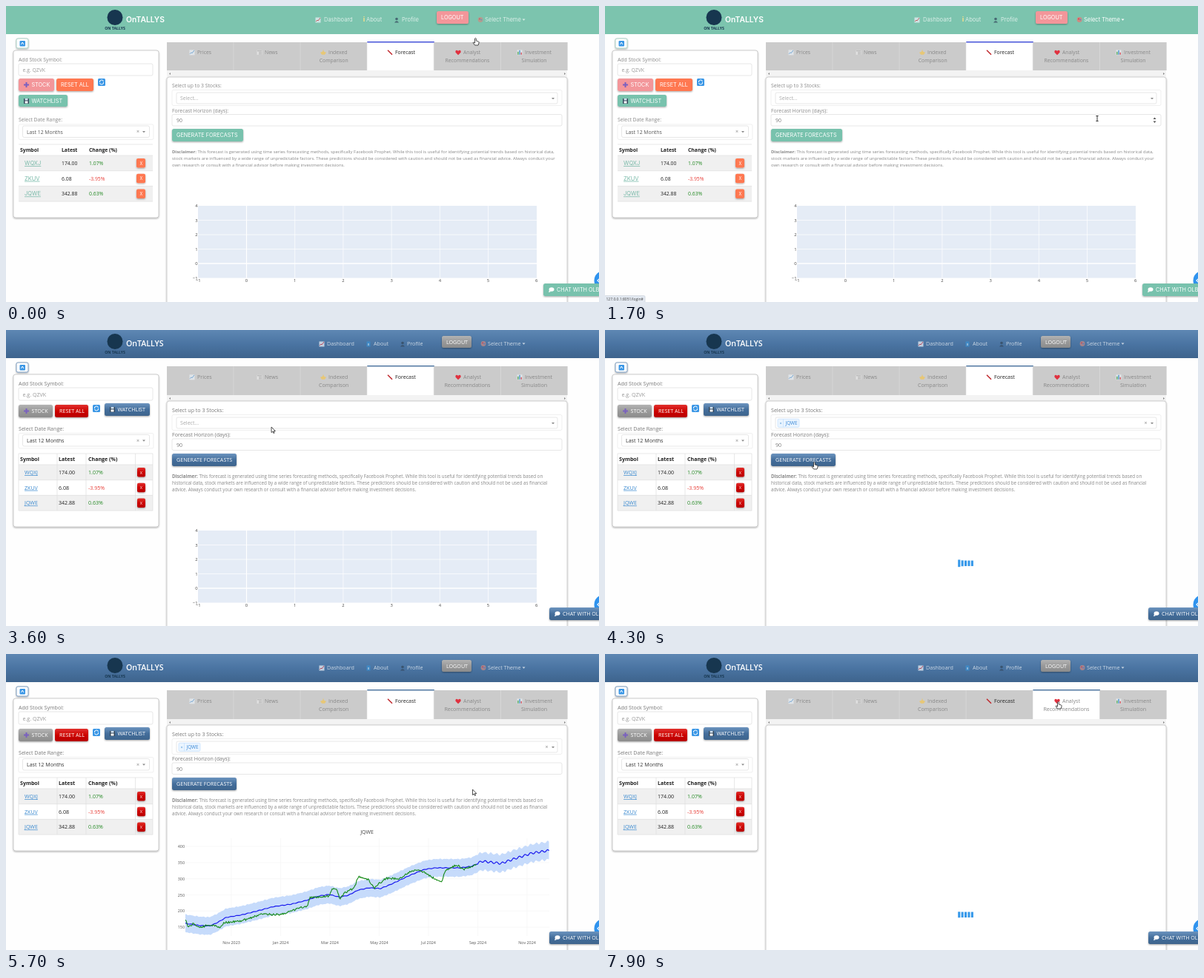
An HTML page that plays this animation: 800x400 px, repeating every 8000 ms.

```html
<!DOCTYPE html>
<html lang="en">
<head>
<meta charset="utf-8">
<title>Stock dashboard</title>
<style>
html, body { margin: 0; height: 100%; overflow: hidden; background: #fefefe; }
svg { display: block; width: 100vw; height: 100vh; font-family: "Open Sans", "Noto Sans", sans-serif; }
.wide { font-family: Inter, "Open Sans", sans-serif; }
</style>
</head>
<body>
<svg viewBox="0 0 800 400">
  <defs>
    <linearGradient id="bar" x2="0" y2="1"><stop stop-color="#5e87b3"/><stop offset=".5" stop-color="#4a74a2"/><stop offset="1" stop-color="#3e648d"/></linearGradient>
    <linearGradient id="navy" x2="0" y2="1"><stop stop-color="#6d94bf"/><stop offset=".5" stop-color="#446e9b"/><stop offset="1" stop-color="#3e648d"/></linearGradient>
    <linearGradient id="gray" x2="0" y2="1"><stop stop-color="#b3b3b3"/><stop offset=".5" stop-color="#999"/><stop offset="1" stop-color="#8c8c8c"/></linearGradient>
    <linearGradient id="red" x2="0" y2="1"><stop stop-color="#e1322f"/><stop offset=".5" stop-color="#cd0200"/><stop offset="1" stop-color="#b80200"/></linearGradient>
    <filter id="shadow" x="-10%" y="-10%" width="120%" height="130%"><feDropShadow dx="0" dy="1" stdDeviation="1" flood-opacity=".35"/></filter>
  </defs>
  <g id="page"></g>
  <g id="overlay"></g>
</svg>
<script>
const LOOP = 8000;
const TIMES = { focus: 400, status: 500, restyle: 1800, blur: 3500, pick: 3800, load: 4200, chart: 5200, tab: 7700 };
const BRAND = 'OnTALLYS', TICKERS = ['WQXJ', 'ZKUV', 'JQWE'];
const ROWS = [['174.00', '1.07%'], ['6.08', '-3.95%'], ['342.88', '0.63%']];

const THEMES = {
  mint: {
    cls: 'wide', body: 6.84, small: 5.92, btn: 7.25, nav: 7.5, bar: '#7cc4ae', primary: '#78c2ad', second: '#f3969a',
    danger: '#ff7851', label: '#888', ink: '#555', link: '#78b9a8', tabTop: '#3a48d6', dy: 0,
    navItems: [[421, 429, 'Dashboard'], [483, 486, 'About'], [527, 534, 'Profile']], theme: 646, logout: [581, 7, 43, 17],
    cardBottom: 286, stock: [17, 98, 48, 17], reset: [68, 98, 50, 17], refresh: [124, 98], watch: [17, 120, 66, 16],
    range: 156, table: 187, cols: [19, 75, 112], generate: 96, chat: 725,
    notes: ['This forecast is generated using time series forecasting methods, specifically Facebook Prophet. While this tool is useful for identifying potential trends based on historical data,',
      'stock markets are influenced by a wide range of unpredictable factors. These predictions should be considered with caution and should not be used as financial advice. Always conduct your',
      'own research or consult with a financial advisor before making investment decisions.']
  },
  slate: {
    cls: '', body: 7.08, small: 6.24, btn: 7.15, nav: 7.15, bar: 'url(#bar)', primary: 'url(#navy)', second: 'url(#gray)',
    danger: 'url(#red)', label: '#777', ink: '#333', link: '#3b8ad0', tabTop: '#446e9b', dy: 1,
    navItems: [[426, 433, 'Dashboard'], [489, 496, 'About'], [535, 541, 'Profile']], theme: 650, logout: [588, 8, 40, 16],
    cardBottom: 266, stock: [17, 101, 46, 17], reset: [66, 101, 45, 17], refresh: [117, 101], watch: [133, 99, 61, 17],
    range: 135.5, table: 167, cols: [19, 71, 111], generate: 87, chat: 733,
    notes: ['This forecast is generated using time series forecasting methods, specifically Facebook Prophet. While this tool is useful for identifying potential trends based on',
      'historical data, stock markets are influenced by a wide range of unpredictable factors. These predictions should be considered with caution and should not be used as financial',
      'advice. Always conduct your own research or consult with a financial advisor before making investment decisions.']
  }
};

const rect = (x, y, w, h, fill, more = '') => `<rect x="${x}" y="${y}" width="${w}" height="${h}" fill="${fill}" ${more}/>`;
const text = (x, y, s, size, fill, more = '') => `<text x="${x}" y="${y}" font-size="${size}" fill="${fill}" ${more}>${s}</text>`;
const path = (d, stroke, width = 1, fill = 'none') => `<path d="${d}" stroke="${stroke}" stroke-width="${width}" fill="${fill}"/>`;
const dot = (x, y, r, fill) => `<circle cx="${x}" cy="${y}" r="${r}" fill="${fill}"/>`;
const box = (x, y, w, h, stroke = '#ddd') => rect(x, y, w, h, '#fff', `rx="2" stroke="${stroke}" stroke-width=".7"`);
const caret = (x, y, fill = '#888') => path(`M${x - 2} ${y - 1}h4l-2 2.2z`, 'none', 0, fill);
const middle = 'text-anchor="middle"', bold = 'font-weight="700"';

function button(th, [x, y, w, h], fill, label, inset = 6) {
  return rect(x, y, w, h, fill, 'rx="2.5" filter="url(#shadow)"') +
    text(x + inset, y + h / 2 + 2.5, label, th.btn, '#fff', `class="${th.cls}"`);
}

// Small pictograms, centred on x, y
const ICONS = {
  chart: rect(-3.5, -3.5, 7, 7, '#e9eef4') + path('M-3 2L-1 0L0 1L3 -3', '#d8434e', 1),
  prices: rect(-3.5, -3.5, 7, 7, '#e6edf3') + path('M-3 2L-1 0L0 1L3 -3', '#5b9bd5', 1),
  book: rect(-2.5, -3.5, 5, 7, '#3b8fd0') + path('M0 -1V2', '#fff', 1),
  person: dot(0, -1.5, 1.8, '#34495e') + path('M-3 3.5Q0 -1 3 3.5z', 'none', 0, '#34495e'),
  palette: dot(0, 0, 3.4, '#cf8a80') + dot(-1, -1, 1, '#d83e50') + dot(1.3, 0, 1, '#5b86c9'),
  news: rect(-3.5, -3, 7, 6, '#e8e8e8') + path('M-3 -2H3M-1 0H3M-1 2H3', '#888', .7),
  star: path('M0 -4L1 -1L4 0L2 3H-2L-4 0L-1 -1z', 'none', 0, '#f0c65a'),
  trend: path('M-3 -3L-1 -1L0 0L3 3', '#c0282d', 1.5),
  heart: path('M0 3.5L-3.5 0Q-4 -3 -2 -3Q0 -3 0 -1.5Q0 -3 2 -3Q4 -3 3.5 0z', 'none', 0, '#e0313f'),
  bars: rect(-3.5, -3.5, 7, 7, '#e6edf3') + rect(-3, -1, 1.6, 4, '#4caf50') + rect(-.8, -3, 1.6, 6, '#3b8fd0') + rect(1.4, 0, 1.6, 3, '#d8434e'),
  floppy: rect(-3.5, -3.5, 7, 7, '#33475b') + rect(-2, -3.5, 4, 2.5, '#cfe0ee') + rect(-2, 0, 4, 3, '#fff'),
  plus: path('M-3.5 0H3.5M0 -3.5V3.5', '#7a60c0', 2)
};
const icon = (name, x, y, opacity = 1) => `<g transform="translate(${x} ${y})" opacity="${opacity}">${ICONS[name]}</g>`;

function navbar(th, focused) {
  const mint = th.cls === 'wide', cls = `class="${th.cls}"`, faded = 'rgba(255,255,255,.72)';
  const names = ['chart', 'book', 'person'];
  let out = rect(0, 0, 800, 38, th.bar) + dot(147, 15.5, 10.5, '#17364f') +
    text(147, 32, BRAND.replace('On', 'ON '), 5.2, '#17364f', `${middle} ${bold}`) +
    text(162, 21.5, BRAND, mint ? 10.3 : 10.6, '#fff', `${cls} font-weight="600"`);
  th.navItems.forEach(([ix, x, s], i) => {
    out += mint && i === 1 ? path('M483 16V21M483 14V15', '#f2e08a', 1.4) : icon(names[i], ix, 19, .75);
    out += text(x, 21.3, s, th.nav, faded, cls);
  });
  return out + button(th, th.logout, th.second, 'LOGOUT') +
    icon('palette', th.theme - 6, 18.5, focused ? 1 : .7) +
    text(th.theme, 21.3, 'Select Theme', th.nav, focused ? '#fff' : faded, cls) + caret(698.5, 18.5, focused ? '#fff' : faded);
}

function sidebar(th) {
  const mint = th.cls === 'wide', b = th.body, r = th.range, top = th.table;
  let out = rect(14, 44, 16, 13, '#fff', `rx="2" stroke="${mint ? '#a9cfc4' : '#7b9cbf'}" filter="url(#shadow)"`) +
    rect(18.5, 47, 7.5, 7.5, '#3b97e6', 'rx="1"') + path('M20.5 52L22.2 49L24 52', '#fff', 1) +
    rect(10, 60, 196, th.cardBottom - 60, '#fff', 'rx="3" stroke="#bbb" stroke-width=".7" filter="url(#shadow)"') +
    text(17, 75, 'Add Stock Symbol:', b, th.label) + box(17, 78, 181, 16 + th.dy) + text(22.5, 89 + th.dy / 2, 'e.g. QZVK', b, '#999') +
    button(th, th.stock, th.second, 'STOCK', 17.5) + icon('plus', th.stock[0] + 10.5, th.stock[1] + 8.5) +
    button(th, th.reset, th.danger, 'RESET ALL') +
    button(th, th.watch, th.primary, 'WATCHLIST', 17.5) + icon('floppy', th.watch[0] + 10.5, th.watch[1] + 8.5);
  const [rx, ry] = th.refresh;
  out += rect(rx, ry, 10, 10, '#3b97e6', 'rx="1.5"') + path(`M${rx + 2.5} ${ry + 5}a2.5 2.5 0 0 1 5 -1M${rx + 7.5} ${ry + 5}a2.5 2.5 0 0 1 -5 1`, '#fff', 1) +
    text(17, r, 'Select Date Range:', b, th.label) + box(17, r + 4, 182, 20.5, '#eaeaea') + box(22.5, r + 6, 171, 15.5) +
    text(28, r + 16.5, 'Last 12 Months', b, th.ink) + text(176, r + 16.3, '×', 7, '#888') + caret(186, r + 14);
  ['Symbol', 'Latest', 'Change (%)'].forEach((s, i) => out += text(th.cols[i], top + 10.3, s, b, '#222', bold));
  ROWS.forEach(([price, change], i) => {
    const y = top + 15 + i * 20.7, base = y + 13;
    if (i !== 1) out += rect(17, y, 181, 20.7, '#f0f0f0');
    out += text(25, base, TICKERS[i], mint ? 7.5 : 7.1, th.link, `class="${th.cls}" text-decoration="underline"`) +
      text(th.cols[1], base, price, b, '#222') + text(th.cols[2], base, change, b, change[0] === '-' ? '#e8403a' : '#258a25') +
      rect(mint ? 176 : 177, y + 4, mint ? 12 : 11, 12.5, th.danger, 'rx="2" filter="url(#shadow)"') +
      text(182.3, y + 12.5, 'X', 5.6, '#fff', `${middle} class="${th.cls}"`);
  });
  const lines = [0, 15, 35.7, 56.4, 77.1].map(d => `M17 ${top + d}H198`).join('');
  return out + path(lines + (mint ? '' : `M17 ${top}v77M69 ${top}v77M108 ${top}v77M174.5 ${top}v77M198 ${top}v77`), '#dedede', .7);
}

const TABS = [['prices', 251, 'Prices'], ['news', 342, 'News'], ['star', 428, 'Indexed', 'Comparison'], ['trend', 518, 'Forecast'],
  ['heart', 610, 'Analyst', 'Recommendations'], ['bars', 693, 'Investment', 'Simulation']];

function tabs(th, active) {
  const bottom = 87 + th.dy;
  let out = '';
  TABS.forEach(([name, ix, first, second], i) => {
    const x = 217 + i * 90.1, on = i === active, fill = i === 3 ? '#222' : '#888';
    out += rect(x, 49, 90.1, bottom - 49, on ? '#fff' : '#cbcbcb') + path(`M${x + 90} 49V${bottom}`, '#ddd', .8);
    if (on) out += rect(x, 48, 90.5, 1.4, th.tabTop);
    out += icon(name, ix, 62.8 + th.dy, i === 3 || i === 4 ? 1 : .75) + text(ix + 7, 65.2 + th.dy, first, th.body, fill);
    if (second) out += text(x + 45, 75.6 + th.dy, second, th.body, fill, middle);
  });
  return out + rect(217, bottom, 540, 8.5, '#f3f3f3') +
    path(`M222 ${bottom + 3}l-2 1.5l2 1.5zM753 ${bottom + 3}l2 1.5l-2 1.5z`, 'none', 0, '#888');
}

function form(th, picked, spinner) {
  const b = th.body, d = th.dy;
  let out = text(224, 110 + d, 'Select up to 3 Stocks:', b, th.label) + box(224, 113.5 + d, 526, 21, '#eaeaea') + box(230, 117 + d, 514, 15);
  if (picked) out += rect(233, 120.3, 29, 11, '#ebf5ff', 'rx="1.5" stroke="#c2e0ff" stroke-width=".7"') +
    text(235.5, 128, '×', 5.5, '#4a96d8') + path('M240.5 120.3v11', '#c2e0ff', .7) + text(243.5, 128.3, TICKERS[2], 6.4, '#3a88d6') + text(727.5, 128, '×', 7, '#888');
  else out += text(235, 127 + d, 'Select...', b, '#aaa');
  out += caret(738, 125 + d) + text(224, 143.5 + d / 2, 'Forecast Horizon (days):', b, th.label) +
    box(224, 146.5 + d / 2, 526, 15.5) + text(230, 156.8 + d, '90', b, '#777');
  if (spinner) out += path('M739.5 153l2 -2.5l2 2.5zM739.5 155.5l2 2.5l2 -2.5z', 'none', 0, '#555');
  out += button(th, [224, 166 + d, th.generate, 17], th.primary, 'GENERATE FORECASTS');
  th.notes.forEach((s, i) => out += text(224, 199 + d * .5 + i * 9.2, (i ? '' : `<tspan ${bold}>Disclaimer:</tspan> `) + s, th.small, '#888'));
  return out;
}

function emptyPlot(dy) {
  let out = rect(259, 270 + dy, 457, 97.5, '#e5ecf6');
  for (let i = 0; i < 8; i++) {
    const x = 259.3 + i * 65.2;
    if (i && i < 7) out += path(`M${x} ${270 + dy}v97.5`, '#fff', i === 1 ? 1.2 : .7);
    out += text(x, 373.4 + dy, String(i - 1).replace('-', '−'), 5.8, '#444', middle);
  }
  for (let i = 0; i < 6; i++) {
    const y = 270 + dy + i * 19.5;
    if (i && i < 5) out += path(`M259 ${y}h457`, '#fff', i === 4 ? 1.4 : .7);
    out += text(258.5, y + 2.1, String(4 - i).replace('-', '−'), 5.8, '#444', 'text-anchor="end"');
  }
  return out;
}

const TREND = [[242, 364], [262, 367], [275, 367.5], [285, 363], [297, 356], [318, 352.5], [340, 347], [360, 341.5], [385, 338], [405, 333],
  [422, 327], [436, 325], [450, 328.5], [462, 326], [475, 319], [490, 316], [505, 317], [520, 311], [545, 299], [565, 291],
  [580, 289], [612, 289], [628, 287], [642, 280], [668, 283], [688, 276], [710, 269], [733, 265.5]];
const HISTORY = [[242, 358], [246, 369], [253, 364], [262, 370], [272, 366], [280, 367], [289, 370], [294, 363], [315, 361], [330, 357],
  [342, 352], [372, 352], [388, 346], [407, 340], [410, 329], [436, 327], [440, 317], [447, 319], [450, 331], [457, 323],
  [470, 316], [475, 301], [489, 305], [497, 316], [505, 309], [513, 303], [530, 304], [545, 294], [556, 291], [563.5, 294.4],
  [577, 303], [588, 307], [593, 292], [608, 285], [618, 291], [635, 285]];

function valueAt(points, x) {
  const i = Math.max(1, points.findIndex(p => p[0] >= x));
  const [x0, y0] = points[i - 1], [x1, y1] = points[i];
  return y0 + (y1 - y0) * (x - x0) / (x1 - x0);
}
const ripple = x => (x > 635 ? 1.4 : .35) * Math.sin(x * 2 * Math.PI / 7.63);
const jitter = x => { const s = Math.sin(x * 127.1) * 43758.5; return (s - Math.floor(s) - .5) * 2.6; };
function sample(from, to, step, y) {
  const out = [];
  for (let x = from; x <= to; x += step) out.push(`${x.toFixed(1)} ${y(x).toFixed(1)}`);
  return out;
}

function forecastPlot() {
  const trend = x => valueAt(TREND, x) + ripple(x);
  const edge = side => sample(242, 733, 1.5, x => trend(x) + side * (12 + .4 * Math.sin(x * 1.3)));
  let out = text(487, 242.6, TICKERS[2], 7, '#444', middle);
  for (let v = 400; v >= 150; v -= 50) {
    const y = 260 + (400 - v) * .437;
    out += path(`M242 ${y}H733`, '#f3f3f3', .6) + text(241, y + 2, v, 5.4, '#555', 'text-anchor="end"');
  }
  ['Nov 2023', 'Jan 2024', 'Mar 2024', 'May 2024', 'Jul 2024', 'Sep 2024', 'Nov 2024'].forEach((s, i) => {
    const x = 304 + i * 66.5;
    out += path(`M${x} 249V381`, '#f3f3f3', .6) + text(x, 391.7, s, 5.4, '#555', middle);
  });
  return out + path(`M${edge(-1).join('L')}L${edge(1).reverse().join('L')}z`, 'none', 0, '#c6dbfb') +
    path('M' + sample(242, 733, 1.1, trend).join('L'), '#1a1aee', 1.2) +
    path('M' + sample(242, 635, 1.1, x => valueAt(HISTORY, x) + jitter(x)).join('L'), '#138a13', 1.1);
}

function page(s) {
  const th = THEMES[s.theme];
  return rect(0, 0, 800, 400, '#fefefe') + navbar(th, s.focused) + sidebar(th) + tabs(th, s.tab) +
    rect(217, 96, 540, 320, '#fff', 'rx="3" stroke="#c4c4c4" stroke-width=".8" filter="url(#shadow)"') +
    (s.tab === 3 ? form(th, s.picked, s.spinner) : '') +
    (s.plot === 'empty' ? emptyPlot(th.dy) : s.plot === 'forecast' ? forecastPlot() : '') +
    dot(807, 371, 13.5, '#2f93ee') + path('M801 368L798 371L801 374', '#fff', 1.2) +
    button(th, [th.chat, 375, 90, 17], th.primary, 'CHAT WITH OLBI', 18) +
    `<ellipse cx="${th.chat + 11}" cy="383" rx="3.5" ry="2.8" fill="#fff"/>` + path(`M${th.chat + 8} 384l-1 3l3 -1z`, 'none', 0, '#fff') +
    (s.status ? rect(-1, 391.5, 55, 10, '#e3e9f1', 'rx="1.5" stroke="#c5ccd6" stroke-width=".6"') + text(1.5, 397.8, '127.0.0.1:8051/login#', 5, '#444') : '');
}

const CURSORS = {
  hand: path('M-1.5 1V-4Q-.6 -5.5 .3 -4V-1L3.5 0Q4.3 .4 4 2L3 5H-1.5L-4 1.5Q-3.5 .2 -1.5 2z', '#222', .8, '#fff'),
  beam: path('M-1.6 -3.5H1.6M0 -3.5V3.5M-1.6 3.5H1.6', '#222', .9),
  arrow: path('M-1.5 -4V3.5L.3 2L1.5 4.5L2.6 4L1.5 1.5H3.8z', '#222', .8, '#fff'),
  cross: path('M-5.5 0H5.5M0 -5.5V5.5', '#111', 1.2)
};
// time, x, y, cursor shape from that time on
const TRACK = [[0, 634, 48, 'hand'], [400, 668, 20, 'hand'], [900, 668, 40, 'hand'], [1200, 672, 90, 'hand'], [1500, 668, 135, 'beam'],
  [1700, 664, 152, 'beam'], [2500, 664, 152, 'arrow'], [2700, 645, 112, 'hand'], [2900, 622, 80, 'hand'], [3100, 560, 100, 'arrow'],
  [3400, 420, 125, 'arrow'], [3800, 300, 145, 'arrow'], [4150, 283, 183, 'hand'], [4700, 283, 183, 'arrow'], [5300, 631, 187, 'arrow'],
  [5900, 631, 187, 'arrow'], [6250, 610, 245, 'cross'], [6700, 561, 290, 'cross'], [7000, 561, 290, 'cross'], [7250, 590, 180, 'arrow'], [7550, 612, 69, 'hand'], [LOOP, 612, 69, 'hand']];

function pointer(t) {
  const i = TRACK.findIndex(k => k[0] > t), a = TRACK[i - 1], b = TRACK[i];
  const p = (t - a[0]) / (b[0] - a[0]), e = p * p * (3 - 2 * p);
  return { x: a[1] + (b[1] - a[1]) * e, y: a[2] + (b[2] - a[2]) * e, shape: a[3] };
}

function loader(elapsed, y) {
  let out = '';
  for (let i = 0; i < 5; i++) {
    const p = (((elapsed - i * 100) / 1200) % 1 + 1) % 1;
    const h = 7.5 * (p < .4 ? 1 + .42 * Math.sin(Math.PI * p / .4) : 1);
    out += rect(476.2 + i * 4.4, y - h / 2, 3.1, h, '#3799ea');
  }
  return out;
}

function modebar() {
  const p = 'M656 234h2l1 -1l1 1h2v5h-6zM681.500 236h6M684.500 233v6M716 233l6 6M722 233l-6 6M727 236l3 -3l3 3M728 236v3h4v-3';
  return path(p, '#a5a5a5', .9) + `<circle cx="673" cy="235" r="2" fill="none" stroke="#666"/>` + path('M674.5 236.500l2 2', '#666', 1.2) +
    rect(695, 233, 6, 6, '#999') + path('M696 236h4M698 234v4', '#fff', .9) + rect(706, 233, 6, 6, '#999') + path('M707 236h4', '#fff', .9) +
    rect(740.5, 232.5, 7.5, 6.5, '#222', 'rx="1"') + path('M742 238v-2M744 238v-3M746 238v-2', '#fff', .8);
}

function tooltip(cursorX) {
  const x = cursorX + 2.5, y = valueAt(HISTORY, x);
  const date = new Date(Date.UTC(2024, 6, 1) + Math.round((x - 570) / 1.09) * 864e5);
  const day = date.toLocaleDateString('en-US', { month: 'short', day: 'numeric', year: 'numeric', timeZone: 'UTC' });
  const value = (400 - (y - 260) / .437).toFixed(2);
  return path(`M${x} ${y}l2.5 -2v4z`, 'none', 0, '#138a13') + rect(x + 2.5, y - 4.3, 61.5, 8.8, '#138a13', 'stroke="#fff" stroke-width=".4"') +
    text(x + 33.2, y + 2.2, `(${day}, ${value})`, 5.7, '#fff', middle) + text(x + 65.5, y + 2.2, `${TICKERS[2]} Histori...`, 5.9, '#2b8a2b');
}

const pageLayer = document.getElementById('page'), overlay = document.getElementById('overlay');
let shown = '';

function draw(now) {
  const t = now % LOOP, T = TIMES, cur = pointer(t);
  const plotted = t >= T.chart && t < T.tab;
  const state = {
    theme: t < T.restyle ? 'mint' : 'slate',
    focused: t >= T.focus && t < T.blur,
    status: t >= T.status && t < T.blur,
    spinner: t >= 1650 && t < 2600,
    picked: t >= T.pick,
    tab: t < T.tab ? 3 : 4,
    plot: t < T.load ? 'empty' : plotted ? 'forecast' : 'none'
  };
  const key = JSON.stringify(state);
  if (key !== shown) {
    pageLayer.innerHTML = page(state);
    shown = key;
  }
  let out = '';
  if (t >= T.load && t < T.chart) out += loader(t - 4180, 315.3);
  if (t >= T.tab) out += loader(t - 7880, 352.3);
  if (plotted && cur.y > 232) out += modebar();
  if (plotted && cur.y > 275) out += tooltip(cur.x);
  overlay.innerHTML = out + `<g transform="translate(${cur.x} ${cur.y})">${CURSORS[cur.shape]}</g>`;
}

const start = performance.now();
function tick() {
  draw(performance.now() - start);
  requestAnimationFrame(tick);
}
tick();
</script>
</body>
</html>
```
